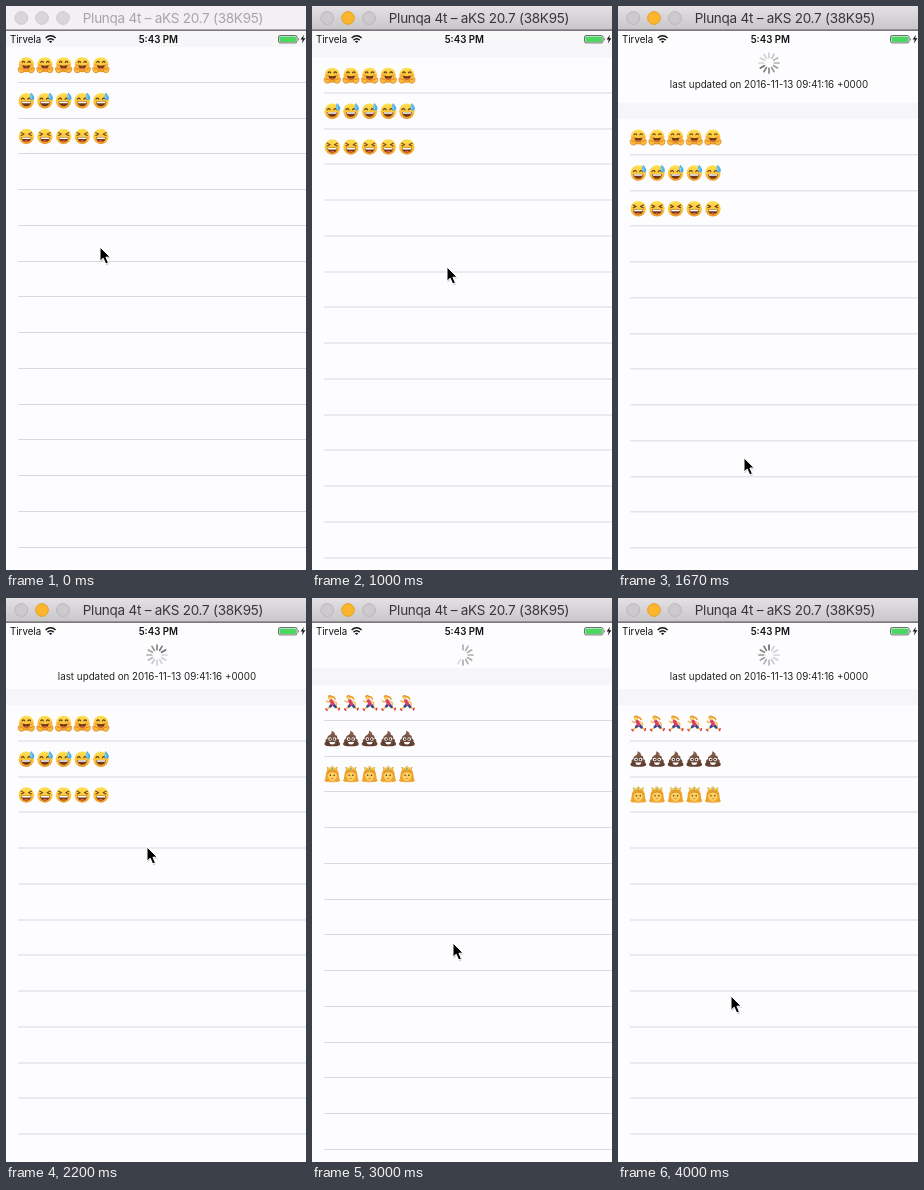
An HTML page that plays this animation: 300 by 564 pixels, repeating every 4070 ms.

```html
<!DOCTYPE html>
<html lang="en">
<head>
<meta charset="utf-8">
<title>Pull to refresh</title>
<style>
  html, body { margin: 0; width: 100%; height: 100%; overflow: hidden; background: #fdfcfe; }
  svg { display: block; position: absolute; left: 0; top: 0; }
  text { font-family: Inter, Roboto, sans-serif; text-anchor: middle; }
  #title { font-size: 13.5px; letter-spacing: -.25px; fill: #a7a4a8; }
  .status { font-size: 9.7px; fill: #111; }
  .dot { fill: #d9d5da; stroke: #cac6cb; stroke-width: .8; }
  .active #title { fill: #38363a; }
  .active #bar { fill: url(#metal); }
  .active .dot { fill: #cdcacd; stroke: #b3b0b4; }
  .active .mid { fill: #fdb52b; stroke: #dd9a25; }
</style>
</head>
<body>
<svg id="stage" width="300" height="564" viewBox="0 0 300 564">
  <defs>
    <linearGradient id="metal" x2="0" y2="1">
      <stop stop-color="#e4e1e5"/><stop offset="1" stop-color="#c9c6ca"/>
    </linearGradient>
    <linearGradient id="skin" x2="0" y2="1">
      <stop stop-color="#ffe152"/><stop offset=".55" stop-color="#fcc53a"/><stop offset="1" stop-color="#ea9428"/>
    </linearGradient>
    <linearGradient id="brown" x2="0" y2="1">
      <stop stop-color="#8d6450"/><stop offset="1" stop-color="#5c3a2c"/>
    </linearGradient>

    <g id="hug">
      <circle r="7.5" cy="-.3" fill="url(#skin)"/>
      <path d="M-4.2-2.6q1.3-2 2.6 0M1.6-2.6q1.3-2 2.6 0" fill="none" stroke="#66391a" stroke-width="1.1" stroke-linecap="round"/>
      <path d="M-4 .1Q0 1.4 4 .1 3.4 4.2 0 4.2T-4 .1z" fill="#713818"/>
      <path d="M-2.2 3.5Q0 1.8 2.2 3.5 0 4.8-2.2 3.5z" fill="#e8604c"/>
      <circle cx="-5.2" cy=".2" r="1.3" fill="#f58c4d" opacity=".6"/>
      <circle cx="5.2" cy=".2" r="1.3" fill="#f58c4d" opacity=".6"/>
      <g id="hand">
        <path d="M-8 2.8Q-8.6 7.8-4.8 7.8-1.6 7.6-2.3 5.3L-4.1 3.5-5.1 4.6-7 2.4z" fill="#fbbb3c" stroke="#d47d20" stroke-width=".7"/>
      </g>
      <use href="#hand" transform="scale(-1 1)"/>
    </g>

    <g id="sweat">
      <circle r="7.7" fill="url(#skin)"/>
      <path d="M-5-1.4q1.5-2.3 3 0M1.5-1.4q1.5-2.3 3 0" fill="none" stroke="#66391a" stroke-width="1.1" stroke-linecap="round"/>
      <path d="M-5 .9H5Q4.3 5.6 0 5.6T-5 .9z" fill="#713818"/>
      <path d="M-4.5 1.1H4.5L3.9 2.6H-3.9z" fill="#fff"/>
      <path d="M4.7-8.2Q8.3-4.7 8-2.3 7.4-.2 5.4-.6 3.1-1.2 3.5-3.8 3.8-6 4.7-8.2z" fill="#4fb2e6"/>
      <path d="M5.2-5.5Q4-2.9 5.2-2" fill="none" stroke="#b5e4fb" stroke-width=".8"/>
    </g>

    <g id="laugh">
      <circle r="7.7" fill="url(#skin)"/>
      <path d="M-5.2-3.8-2.2-2.3-5-1M5.2-3.8 2.2-2.3 5-1" fill="none" stroke="#66391a" stroke-width="1.1" stroke-linecap="round" stroke-linejoin="round"/>
      <path d="M-5 .8H5Q4.3 5.7 0 5.7T-5 .8z" fill="#713818"/>
      <path d="M-4.5 1H4.5L3.9 2.5H-3.9z" fill="#fff"/>
      <path d="M-2.4 4.8Q0 3 2.4 4.8 0 6.2-2.4 4.8z" fill="#e8604c"/>
    </g>

    <g id="run" fill="none" stroke-linecap="round" stroke-linejoin="round">
      <path d="M1.5 2 4 4.6 7 6.2" stroke="#f3bd52" stroke-width="1.7"/>
      <path d="M0 2-2.6 4.2-5.8 6.6" stroke="#f3bd52" stroke-width="1.7"/>
      <path d="M.8 1.2 3.2 3.8M.4 1.2-2 3.3" stroke="#3c4a8f" stroke-width="2.8"/>
      <path d="M-1.2-2.4-4.2-.8-6-2.2M.4-2.2 4-.4 4.2 2" stroke="#f3bd52" stroke-width="1.4"/>
      <path d="M-1.2-2.2.5 1" stroke="#dc3f68" stroke-width="3.4"/>
      <path d="M-1.5-6.2Q1.6-7 2.8-4" stroke="#e9a32c" stroke-width="1.7"/>
      <circle cx="-2.3" cy="-5.3" r="2" fill="#fbc95d"/>
      <path d="M-3.9-6.4Q-2.6-8.2-.6-6.2" stroke="#e0972a" stroke-width="1.3"/>
      <path d="M-6.4 6-5.2 7.4M7.2 5.2 6.6 7" stroke="#d8365c" stroke-width="1.4"/>
    </g>

    <g id="pile">
      <path d="M-.8-8Q3.2-6.6 2.6-3.9 5.6-3 4.8-.2 7.4.5 6.6 3 8.6 4.2 7.6 6.3 6.6 7.6 0 7.6T-7.6 6.3Q-8.6 4.2-6.6 3-7.4.5-4.8-.2-5.4-2.7-2.6-3.8-.2-5-.8-8z" fill="url(#brown)"/>
      <path d="M-4.4-.1Q0 1 4.2-1.2M-6.2 3.4Q-4 4.6-3 4.3" fill="none" stroke="#4c2f24" stroke-width=".7"/>
      <circle cx="-2.3" cy=".3" r="1.8" fill="#fff"/><circle cx="2.3" cy=".3" r="1.8" fill="#fff"/>
      <circle cx="-2.1" cy=".4" r=".9" fill="#261a17"/><circle cx="2.1" cy=".4" r=".9" fill="#261a17"/>
      <path d="M-3.2 3.3H3.2Q2.4 5.9 0 5.9T-3.2 3.3z" fill="#fff"/>
    </g>

    <g id="crown">
      <path d="M0-6.2Q6.6-6 6.6 1 6.8 4.6 8 6.2 5 8.4 2.6 6.8H-2.6Q-5 8.4-8 6.2-6.8 4.6-6.6 1-6.6-6 0-6.2z" fill="#eea42c"/>
      <path d="M-2 4H2L3.4 7.8H-3.4z" fill="#f1b147"/>
      <ellipse cy="1" rx="4.6" ry="5.2" fill="#fed260"/>
      <path d="M-5 .2Q-4-4 0-4T5 .2Q3.4-2.3 0-2.5-3.4-2.3-5 .2z" fill="#e0942a"/>
      <circle cx="-1.9" cy=".8" r=".75" fill="#4d2b18"/><circle cx="1.9" cy=".8" r=".75" fill="#4d2b18"/>
      <path d="M-1.6 3.6Q0 5 1.6 3.6z" fill="#d5485a"/>
      <path d="M-4.4-4.2-5.2-7.3-2.5-6 0-8.4 2.5-6 5.2-7.3 4.4-4.2Q0-5.6-4.4-4.2z" fill="#ffd84c" stroke="#c88720" stroke-width=".5"/>
      <circle cy="-5.9" r=".8" fill="#42a4dc"/>
    </g>
  </defs>

  <rect width="300" height="564" fill="#f6f5f7"/>
  <rect id="veil" y="24.5" width="300" fill="#fdfcfe"/>
  <g id="refresh">
    <g id="spinner" stroke="#555" stroke-width="1.7" stroke-linecap="round"></g>
    <text id="note" x="151" y="82" font-size="9.8" fill="#222">last updated on 2016-11-13 09:41:16 +0000</text>
  </g>

  <g id="table">
    <rect y="24.5" width="300" height="16.3" fill="#f6f5f7"/>
    <rect y="40.8" width="300" height="540" fill="#fdfcfe"/>
    <g id="lines" fill="#dbd9dd"></g>
    <g id="before"></g>
    <g id="after"></g>
  </g>

  <g class="status">
    <text x="4" y="36.5" style="text-anchor:start">Tirvela</text>
    <g fill="none" stroke="#111" stroke-width="1.4">
      <path d="M39.6 32.1Q44.6 27.6 49.6 32.1M41.5 34.1Q44.6 31.4 47.7 34.1"/>
    </g>
    <path d="M43 35.4Q44.6 34.2 46.2 35.4L44.6 37z"/>
    <text x="152.3" y="36.5" font-weight="600">5:43 PM</text>
    <rect x="272.5" y="29.5" width="18.5" height="7.4" rx="1.6" fill="none" stroke="#333" stroke-width=".7"/>
    <rect x="273.4" y="30.4" width="16.7" height="5.6" rx=".8" fill="#4cd763"/>
    <path d="M292 31.7q1.3 1.5 0 3z"/>
    <path d="M298 28.8 294.6 33.6H296.8L295.8 37.4 299.4 32.3H297.1z"/>
  </g>

  <rect id="bar" width="300" height="24" fill="#f3eff4"/>
  <rect y="23.6" width="300" height="1.1" fill="#454347"/>
  <circle class="dot" cx="15.3" cy="12" r="6.4"/>
  <circle class="dot mid" cx="36" cy="12" r="6.4"/>
  <circle class="dot" cx="57" cy="12" r="6.4"/>
  <text id="title" x="167" y="17.2">Plunqa 4t – aKS 20.7 (38K95)</text>

  <g id="cursor">
    <path d="M0 0V14.2L3.2 11.2 5.7 17 8.4 15.8 5.9 10.2H10.2z" transform="translate(.6 1.4)" fill="#000" opacity=".18"/>
    <path d="M0 0V14.2L3.2 11.2 5.7 17 8.4 15.8 5.9 10.2H10.2z" fill="#000" stroke="#fff" stroke-width="1" stroke-linejoin="round"/>
  </g>
</svg>
<script>
const LOOP = 4070, STEP = 200 / 3, ROW = 35.73, TOP = 40.8;
const ACTIVATE = 330, RELOAD = 2260;
const $ = id => document.getElementById(id);
const clamp = v => Math.max(0, Math.min(1, v));

// [ms, x, y] of the pointer tip
const pointer = [
  [0, 94, 241], [200, 112, 249], [400, 130, 235], [530, 134, 222], [730, 134, 219],
  [870, 134, 228], [1000, 135, 261], [1200, 133, 335], [1400, 129, 408], [1550, 126, 446],
  [1670, 126, 452], [1800, 130, 415], [2000, 138, 308], [2200, 141, 249], [2400, 143, 212],
  [2530, 142, 206], [2700, 142, 214], [2870, 142, 275], [3000, 141, 345], [3200, 139, 440],
  [3330, 138, 465], [3500, 135, 458], [4000, 113, 398]
];
// [ms, distance] the list is pulled down
const pull = [
  [0, 0], [870, 0], [1000, 10.5], [1200, 38], [1400, 66], [1530, 80], [1600, 79],
  [1670, 72], [1800, 67], [1870, 66.5], [2230, 66.5], [2300, 55], [2400, 19], [2470, 4],
  [2530, 0], [2650, 0], [2750, 5], [2870, 22], [3000, 46], [3200, 76], [3330, 82],
  [3400, 80], [3530, 69], [3650, 66.5]
];

function at(keys, t, col) {
  const i = keys.findIndex(k => k[0] > t);
  if (i < 0) return keys[keys.length - 1][col];
  const a = keys[i - 1], b = keys[i];
  return a[col] + (b[col] - a[col]) * (t - a[0]) / (b[0] - a[0]);
}

function add(parent, tag, attrs) {
  const el = document.createElementNS('http://www.w3.org/2000/svg', tag);
  for (const k in attrs) el.setAttribute(k, attrs[k]);
  return parent.appendChild(el);
}

function fill(id, icons) {
  icons.forEach((icon, r) => {
    for (let c = 0; c < 5; c++)
      add($(id), 'use', { href: '#' + icon, x: 20.3 + c * 18.65, y: TOP + ROW * (r + .5) + .3 });
  });
}

fill('before', ['hug', 'sweat', 'laugh']);
fill('after', ['run', 'pile', 'crown']);
for (let k = 1; k < 16; k++)
  add($('lines'), 'rect', { x: 12, y: Math.floor(TOP + ROW * k), width: 288, height: 1 });
const spokes = Array.from({ length: 12 }, (_, i) =>
  add($('spinner'), 'path', { d: 'M0-5.3V-10', transform: `rotate(${i * 30})` }));

function drawRefresh(t, d) {
  const closing = t > 2230 && t < 2600;
  const pulling = t < 1400 || (t > 2600 && t < 3150);
  const head = Math.floor(t * .012);
  const scale = closing ? clamp(d / 60) : 1;
  $('veil').setAttribute('height', d);
  $('veil').setAttribute('opacity', clamp(d / 45));
  $('refresh').setAttribute('opacity', clamp((d - 15) / 40));
  $('spinner').setAttribute('transform', `translate(151 57) scale(${scale})`);
  spokes.forEach((s, i) => {
    const age = ((head - i) % 12 + 12) % 12;
    const shown = clamp((d - 20) / 42 * 12 - i);
    s.setAttribute('opacity', pulling ? shown * .6 : Math.max(.25, .85 - age * .075));
  });
}

function draw(now) {
  const t = Math.floor((now % LOOP + 4) / STEP) * STEP;
  const d = at(pull, t, 1);
  $('stage').classList.toggle('active', t >= ACTIVATE);
  $('table').setAttribute('transform', `translate(0 ${d})`);
  $('before').style.display = t < RELOAD ? '' : 'none';
  $('after').style.display = t < RELOAD ? 'none' : '';
  $('cursor').setAttribute('transform', `translate(${at(pointer, t, 1)} ${at(pointer, t, 2)})`);
  drawRefresh(t, d);
}

const start = performance.now();
function tick() {
  draw(performance.now() - start);
  requestAnimationFrame(tick);
}
tick();
</script>
</body>
</html>
```
